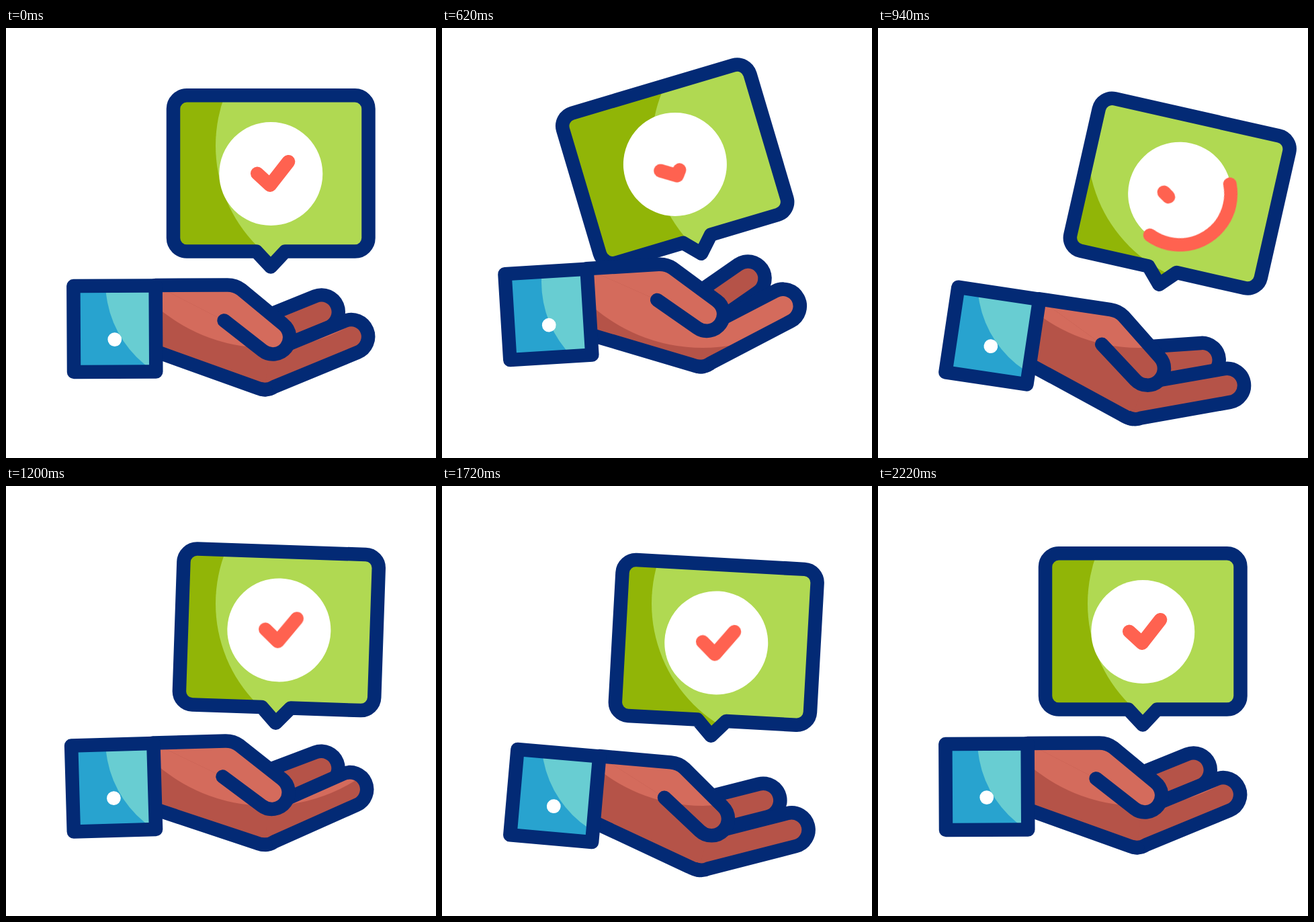
An HTML page without scripts that plays this animation: 640 by 640 pixels, repeating every 2.42 s.

```html
<!DOCTYPE html>
<html lang="en">
<head>
<meta charset="utf-8">
<title>Approval in hand</title>
<style>
@property --hx { syntax: "<length>"; inherits: true; initial-value: 0px }
@property --hy { syntax: "<length>"; inherits: true; initial-value: 0px }
@property --ha { syntax: "<angle>"; inherits: true; initial-value: 0deg }
@property --curl { syntax: "<angle>"; inherits: true; initial-value: 0deg }
@property --back { syntax: "<angle>"; inherits: true; initial-value: 0deg }
@property --bx { syntax: "<length>"; inherits: true; initial-value: 0px }
@property --by { syntax: "<length>"; inherits: true; initial-value: 0px }
@property --ba { syntax: "<angle>"; inherits: true; initial-value: 0deg }

html, body { margin: 0; width: 100%; height: 100%; overflow: hidden; background: #fff }
svg {
  display: block; width: 100%; height: 100%;
  animation: 2.42s cubic-bezier(.37, 0, .63, 1) infinite;
  animation-name: hand-x, hand-y, hand-turn, finger-curl, back-curl, bubble-x, bubble-y, bubble-turn;
}
.line { fill: none; stroke: #032a75; stroke-width: 20.5; stroke-linejoin: round; stroke-linecap: round }
.butt { stroke-linecap: butt }
.mark { fill: none; stroke: #ff6250; stroke-width: 20; stroke-linejoin: round; stroke-linecap: round }

.hand, .finger, .back {
  --pose: translate(calc(213px + var(--hx)), calc(510px + var(--hy))) rotate(var(--ha)) translate(-213px, -510px);
}
.hand { transform: var(--pose) }
.finger { transform: var(--pose) translate(385px, 539px) rotate(var(--curl)) translate(-385px, -539px) }
.back { transform: var(--pose) translate(394px, 468px) rotate(var(--back)) translate(-394px, -468px) }
.bubble { transform: translate(calc(394px + var(--bx)), calc(217px + var(--by))) rotate(var(--ba)) translate(-394px, -217px) }

/* Hand: settling swing about the wrist */
@keyframes hand-x {
  0%, 25.62%, 53.72%, 100% { --hx: 0px }
  15.7% { --hx: -3.5px }
  38.84% { --hx: -1.6px }
}
@keyframes hand-y {
  0%, 89.26%, 100% { --hy: 0px }
  15.5% { --hy: 28.3px }
  28.51% { --hy: -31px }
  39.67%, 41.32% { --hy: 18px }
  58.68% { --hy: -21px }
  71.9% { --hy: 18px }
}
@keyframes hand-turn {
  0%, 85.95%, 100% { --ha: -.3deg }
  15.91% { --ha: -13deg }
  36.98%, 39.67% { --ha: 8.5deg }
  54.13% { --ha: -4.5deg }
  71.07% { --ha: 5deg }
}
@keyframes finger-curl {
  0%, 80.99%, 100% { --curl: 0deg }
  14.05% { --curl: -7.5deg }
  37.19%, 39.67% { --curl: 3.5deg }
  59.5% { --curl: -4deg }
  72.73% { --curl: 3deg }
}
@keyframes back-curl {
  0%, 88%, 100% { --back: 0deg }
  16.53%, 20.66% { --back: -13deg }
  39.67% { --back: 9.5deg }
  59.09% { --back: -3.5deg }
  73.55% { --back: 3deg }
}

/* Bubble: same swing, slightly late */
@keyframes bubble-x {
  0%, 91.74%, 100% { --bx: 0px }
  16.94%, 19.01% { --bx: -80px }
  39.26% { --bx: 55px }
  57.02% { --bx: -13px }
  73.14% { --bx: 15px }
  85.95% { --bx: -1.5px }
}
@keyframes bubble-y {
  0%, 90.91%, 100% { --by: 0px }
  16.53%, 18.39% { --by: 40px }
  30.58% { --by: -43px }
  39.67% { --by: 31px }
  59.92% { --by: -38px }
  76.03% { --by: 31px }
}
@keyframes bubble-turn {
  0%, 91.74%, 100% { --ba: 0deg }
  18.6%, 21.9% { --ba: -20deg }
  39.67% { --ba: 12.9deg }
  57.23% { --ba: -5.2deg }
  73.14% { --ba: 3.5deg }
  85.95% { --ba: -.3deg }
}

/* Tick is wiped, a ring sweeps round, tick is redrawn; its short arm flattens meanwhile */
.tick { animation: tick 2.42s linear infinite, tick-arm 2.42s linear infinite }
.ring { animation: ring 2.42s linear infinite }
@keyframes tick {
  0%, 19.83% { stroke-dasharray: 100 200; opacity: 1 }
  31.4% { stroke-dasharray: 0 200; opacity: 1 }
  31.41%, 37.59% { stroke-dasharray: 0 200; opacity: 0 }
  37.6% { stroke-dasharray: 0 200; opacity: 1 }
  47.1%, 100% { stroke-dasharray: 100 200; opacity: 1 }
}
@keyframes tick-arm {
  0%, 19.83%, 47.1%, 100% { d: path("M374 216.5L393 234 420.3 199") }
  25.62%, 38.84% { d: path("M370.8 220L392.5 234 420.3 199") }
}
@keyframes ring {
  0%, 30.57% { stroke-dasharray: 0 100; stroke-dashoffset: 0; opacity: 0 }
  30.58% { stroke-dasharray: 0 100; stroke-dashoffset: 0; opacity: 1 }
  34.71% { stroke-dasharray: 20 100; stroke-dashoffset: 0 }
  38.84% { stroke-dasharray: 38 100; stroke-dashoffset: -18 }
  42.15% { stroke-dasharray: 38 100; stroke-dashoffset: -50 }
  45.45% { stroke-dasharray: 18 100; stroke-dashoffset: -82 }
  49.59% { stroke-dasharray: 0 100; stroke-dashoffset: -100; opacity: 1 }
  49.6%, 100% { stroke-dasharray: 0 100; stroke-dashoffset: -100; opacity: 0 }
}
</style>
</head>
<body>
<svg viewBox="0 0 640 640">
  <defs>
    <path id="card" d="M269 100.3H519.5a20 20 0 0 1 20 20V312.5a20 20 0 0 1-20 20H415.5L394 355.5 372.5 332.5H269a20 20 0 0 1-20-20V120.3a20 20 0 0 1 20-20Z"/>
    <path id="cuff" d="M101 383.5H223.3V511.5H101Z"/>
    <path id="palm" d="M223 383H330Q342 383 351 390L413 442 421 461 410 490 398 534Q385 542 371 535.5L223 481.5Z"/>
    <path id="front" d="M385 539L399 535 523.6 484.4A25.3 25.3 0 0 0 504.6 437.5L412 475 390 500Z"/>
    <path id="thumb" d="M223 383H330Q342 383 351 390L413 442A24.5 24.5 0 0 1 382 481L325 436"/>
    <circle id="skin-light" cx="388" cy="226" r="250" fill="#d46b5c"/>
    <clipPath id="in-card"><use href="#card" class="bubble"/></clipPath>
    <clipPath id="in-cuff"><use href="#cuff" class="hand"/></clipPath>
    <clipPath id="in-skin"><use href="#palm" class="hand"/><use href="#front" class="finger"/></clipPath>
    <clipPath id="in-thumb"><use href="#thumb" class="hand"/></clipPath>
  </defs>

  <!-- The light discs stay still while the shapes move across them -->
  <use href="#card" class="bubble" fill="#91b507"/>
  <g clip-path="url(#in-card)"><circle cx="524" cy="175" r="212" fill="#b0d952"/></g>
  <g class="bubble">
    <use href="#card" class="line"/>
    <circle cx="394.3" cy="217" r="77" fill="#fff"/>
    <circle class="mark ring" cx="394.3" cy="217" r="76" pathLength="100" transform="rotate(-90 394.3 217)"/>
    <path class="mark tick" pathLength="100" d="M374 216.5L393 234 420.3 199"/>
  </g>

  <g class="back" stroke-linecap="round">
    <path d="M405 450L470 424" stroke="#032a75" stroke-width="71"/>
    <path d="M405 450L470 424" stroke="#b55348" stroke-width="30"/>
  </g>

  <g fill="#b55348">
    <use href="#palm" class="hand"/>
    <use href="#front" class="finger"/>
  </g>
  <g clip-path="url(#in-skin)"><use href="#skin-light"/></g>
  <path class="line butt finger" d="M378 538Q390 541 399 535L523.6 484.4A25.3 25.3 0 0 0 504.6 437.5L412 475"/>
  <path class="line hand" d="M223 481.5L371 535.5Q379 539 386 539.3"/>

  <use href="#thumb" class="hand" fill="#b55348"/>
  <g clip-path="url(#in-thumb)"><use href="#skin-light"/></g>
  <use href="#thumb" class="line hand"/>

  <use href="#cuff" class="hand" fill="#28a3cf"/>
  <g clip-path="url(#in-cuff)"><circle cx="306" cy="378" r="158" fill="#68cdd2"/></g>
  <use href="#cuff" class="line hand"/>
  <circle class="hand" cx="162" cy="463.3" r="10.4" fill="#fff"/>
</svg>
</body>
</html>
```
